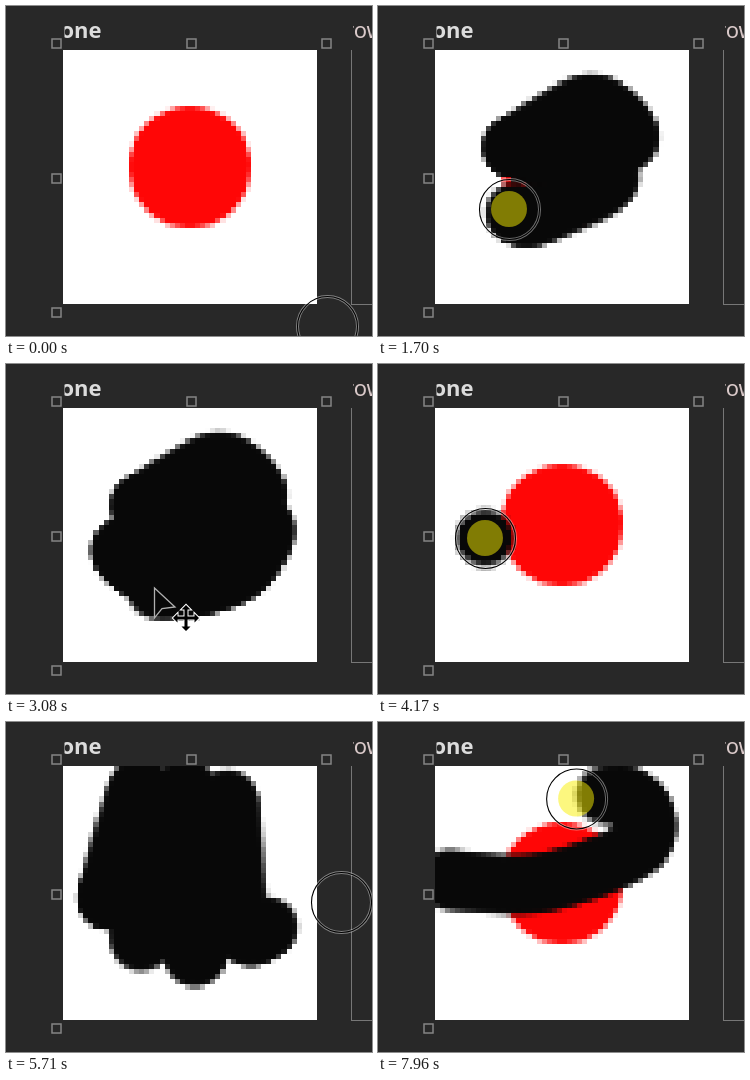
An HTML page with a canvas that plays this animation: 366 px wide and 330 px high, repeating every 8 s.

```html
<!DOCTYPE html>
<html lang="en">
<meta charset="utf-8">
<title>Brush painting on an artboard</title>
<style>
  html, body { margin: 0; width: 100%; height: 100%; overflow: hidden; background: #282828; }
  canvas { display: block; }
</style>
<canvas id="stage" width="366" height="330"></canvas>
<script>
const ctx = document.getElementById('stage').getContext('2d');
const art = document.createElement('canvas');
art.width = art.height = 50;
const pix = art.getContext('2d');

const LOOP = 8000, STEP = 77.2, LAST = 103;
const BOARD = { x: 57, y: 44, size: 254 };
const LAG = .5, STAMPS_PER_STEP = 8;

// Each gesture runs a spline through evenly timed points; those with an undo step paint.
const gestures = [
  { from: 0, to: 2, points: [[321, 320], [157, 148]] },
  { from: 4, to: 11, undo: 46, points: [[157, 148], [157, 148], [134, 141]] },
  { from: 11, to: 33, undo: 46, points: [[134, 141], [212, 98], [250, 135], [170, 150],
    [232, 172], [160, 209], [131, 203], [118, 182], [185, 165], [256, 160], [240, 202],
    [195, 222], [150, 225]] },
  { from: 49, to: 52, points: [[224, 244], [110, 174]] },
  { from: 54, to: 72, undo: 89, points: [[107, 174], [103, 168], [135, 66], [135, 220],
    [180, 66], [187, 231], [204, 175], [222, 78], [236, 205], [262, 205]] },
  { from: 72, to: 74, points: [[262, 205], [335, 180]] },
  { from: 89, to: 95, points: [[335, 180], [160, 165], [72, 156]] },
  { from: 96, to: 104, undo: 104, points: [[69, 158], [165, 161], [262, 122], [248, 74], [150, 85]] }
];
const ARROW = { from: 40, to: 47 };

function positionAt({ from, to, points }, step) {
  const end = points.length - 1;
  const u = Math.max(0, Math.min(1, (step - from) / (to - from))) * end;
  const i = Math.min(Math.floor(u), end - 1), t = u - i;
  const point = n => points[Math.max(0, Math.min(end, n))];
  const [a, b, c, d] = [-1, 0, 1, 2].map(n => point(i + n));
  return [0, 1].map(k => b[k] + t / 2 * (c[k] - a[k]
    + t * (2 * a[k] - 5 * b[k] + 4 * c[k] - d[k] + t * (3 * (b[k] - c[k]) + d[k] - a[k]))));
}

function disc(g, x, y, radius, fill) {
  g.fillStyle = fill;
  g.beginPath();
  g.arc(x, y, radius, 0, 7);
  g.fill();
}

function stamp([x, y]) {
  const soft = pix.createRadialGradient(x, y, 24.5, x, y, 32.5);
  soft.addColorStop(0, 'rgb(8, 8, 8)');
  soft.addColorStop(1, 'rgba(8, 8, 8, 0)');
  disc(pix, x, y, 33, soft);
}

// The paint trails the brush a little until the button is released.
function paint(gesture, step) {
  const head = step >= gesture.to ? gesture.to : Math.max(gesture.from, step - LAG);
  for (let s = gesture.from; s <= head; s += 1 / STAMPS_PER_STEP) stamp(positionAt(gesture, s));
}

function drawArt(step) {
  const { x, y, size } = BOARD, scale = 50 / size;
  pix.setTransform(scale, 0, 0, scale, -x * scale, -y * scale);
  pix.fillStyle = '#fff';
  pix.fillRect(x, y, size, size);
  disc(pix, x + size * .5, y + size * .46, size * .24, '#ff0606');
  for (const g of gestures)
    if (g.undo && step >= g.from && step < g.undo) paint(g, step);
  ctx.imageSmoothingEnabled = false;
  ctx.drawImage(art, x, y, size, size);
}

function label(text, font, color, x, clipX) {
  ctx.save();
  ctx.beginPath();
  ctx.rect(clipX, 0, 366, 40);
  ctx.clip();
  ctx.font = font;
  ctx.fillStyle = color;
  ctx.fillText(text, x, 32);
  ctx.restore();
}

function drawWorkspace() {
  ctx.fillStyle = '#282828';
  ctx.fillRect(0, 0, 366, 330);
  label('one', '600 22px "Noto Sans", sans-serif', '#dcdcdc', 54.5, 58.5);
  label('row', '22px "Noto Sans", sans-serif', '#d8c8c8', 339, 347);
  ctx.lineWidth = 1;
  ctx.strokeStyle = '#777';
  ctx.strokeRect(345.5, 43.5, 255, 255);
  ctx.clearRect(346, 43, 20, 1);
  ctx.fillStyle = '#282828';
  ctx.fillRect(345, 43, 21, 1);
}

function drawHandles() {
  ctx.lineWidth = 1.5;
  ctx.strokeStyle = '#858585';
  for (const [x, y] of [[50.5, 37.5], [185.5, 37.5], [320.5, 37.5], [50.5, 172.5], [50.5, 306.5]])
    ctx.strokeRect(x - 4.5, y - 4.5, 9, 9);
}

function drawBrush([x, y], pressed) {
  if (pressed) disc(ctx, x, y, 18, 'rgba(250, 240, 0, .5)');
  ctx.beginPath();
  ctx.arc(x + .5, y + .5, 30, 0, 7);
  // A pale halo keeps the black ring visible on dark ground.
  for (const [width, color] of [[3, 'rgba(255, 255, 255, .42)'], [1.1, '#000']]) {
    ctx.lineWidth = width;
    ctx.strokeStyle = color;
    ctx.stroke();
  }
}

function drawArrow() {
  ctx.fillStyle = '#080808';
  ctx.strokeStyle = '#b0b0b0';
  ctx.lineWidth = 1.3;
  const pointer = new Path2D('M148.5 224V254L156 244.5L169 243Z');
  ctx.fill(pointer);
  ctx.stroke(pointer);

  const cross = new Path2D();
  const arm = new Path2D('M-1.5 0V-8.5H-4.5L0 -13L4.5 -8.5H1.5V0Z');
  for (let i = 0; i < 4; i++)
    cross.addPath(arm, new DOMMatrix().translate(180, 254).rotate(i * 90));
  ctx.strokeStyle = '#fff';
  ctx.lineWidth = 2;
  ctx.stroke(cross);
  ctx.fillStyle = '#000';
  ctx.fill(cross);
}

function render(now) {
  const step = Math.min(LAST, Math.floor((now % LOOP + 13) / STEP));
  drawWorkspace();
  drawArt(step);
  drawHandles();
  if (step >= ARROW.from && step < ARROW.to) return drawArrow();
  const gesture = gestures.filter(g => g.from <= step).pop();
  drawBrush(positionAt(gesture, step), gesture.undo && step < gesture.to);
}

const start = performance.now();
(function tick() {
  render(performance.now() - start);
  requestAnimationFrame(tick);
})();
</script>
</html>
```
